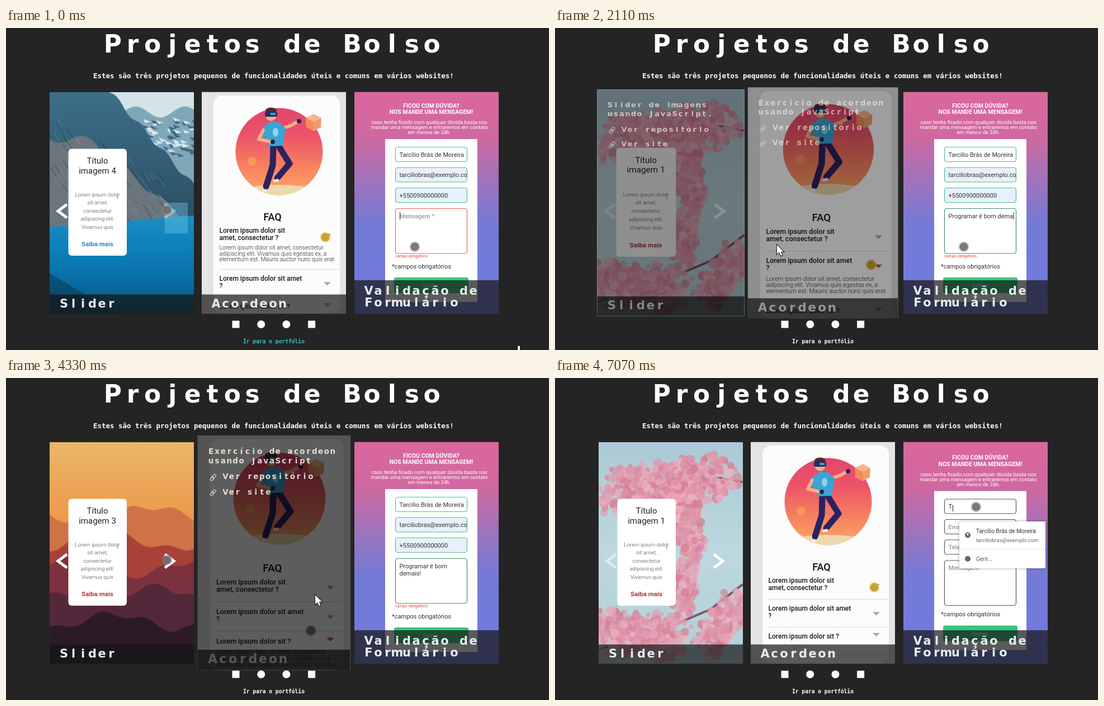
These frames come from a looping animation (971x577 px, 7100 ms). An HTML page with a canvas:

```html
<!DOCTYPE html>
<html lang="pt-BR">
<head>
<meta charset="utf-8">
<title>Projetos de Bolso</title>
<style>
html, body { margin: 0; width: 100%; height: 100%; overflow: hidden; background: #242424; }
canvas { display: block; width: 971px; height: 577px; }
</style>
</head>
<body>
<canvas id="stage" width="971" height="577"></canvas>
<script>
const LOOP = 7100;
const c = document.getElementById('stage').getContext('2d');
const CARD = { y: 114.5, w: 258, h: 397.5 };
const PERSON = 'Tarcílio Brás de Moreira', MAIL = 'tarciliobras@exemplo.com', PHONE = '+5500900000000';

// --- timing helpers ---
const clamp = v => Math.max(0, Math.min(1, v));
const mix = (a, b, u) => a + (b - a) * u;
const ramp = (t, from, to) => clamp((t - from) / (to - from));
const inside = (t, from, to) => t >= from && t < to;

// Stops are [arrival, x, y]; each move takes at most `travel` ms and ends on arrival.
function glide(stops, t, travel) {
  const i = stops.findIndex(s => s[0] > t);
  if (i < 1) return stops.at(i).slice(1);
  const [left, x0, y0] = stops[i - 1], [arrival, x1, y1] = stops[i];
  const u = ramp(t, Math.max(left, arrival - travel), arrival);
  return [mix(x0, x1, u), mix(y0, y1, u)];
}
function random(seed) {
  return () => (seed = (seed * 16807) % 2147483647) / 2147483647;
}

// --- drawing helpers ---
function text(s, x, y, font, color, align = 'left') {
  c.font = font;
  c.fillStyle = color;
  c.textAlign = align;
  c.fillText(s, x, y);
}
function lines(list, x, y, step, font, color, align) {
  list.forEach((s, i) => text(s, x, y + i * step, font, color, align));
}
const roboto = (size, weight = 400) => `${weight} ${size}px Roboto, sans-serif`;
const mono = size => `bold ${size}px "DejaVu Sans Mono", monospace`;
// Broad letters, each centred in a cell of the same width.
function wide(s, x, y, pitch, color = '#fff') {
  const font = `bold ${pitch * 1.23}px "DejaVu Sans", sans-serif`;
  [...s].forEach((ch, i) => text(ch, x + (i + .5) * pitch, y, font, color, 'center'));
}
function rect(x, y, w, h, color, g = c) {
  g.fillStyle = color;
  g.fillRect(x, y, w, h);
}
function round(x, y, w, h, r, fill, stroke) {
  c.beginPath();
  c.roundRect(x, y, w, h, r);
  if (fill) { c.fillStyle = fill; c.fill(); }
  if (stroke) { c.strokeStyle = stroke; c.lineWidth = 1.2; c.stroke(); }
}
function oval(x, y, rx, ry, color, g = c) {
  g.fillStyle = color;
  g.beginPath();
  g.ellipse(x, y, rx, ry, 0, 0, 7);
  g.fill();
}
const disc = (x, y, r, color, g) => oval(x, y, r, r, color, g);
function poly(pts, color, g = c) {
  g.fillStyle = color;
  g.beginPath();
  pts.forEach(p => g.lineTo(...p));
  g.fill();
}
function line(pts, color, width, g = c) {
  g.strokeStyle = color;
  g.lineWidth = width;
  g.beginPath();
  pts.forEach(p => g.lineTo(...p));
  g.stroke();
}
function shade(g, y0, y1, ...colors) {
  const s = g.createLinearGradient(0, y0, 0, y1);
  colors.forEach((k, i) => s.addColorStop(i / (colors.length - 1), k));
  return s;
}
// Fills everything below the curve y = height(x).
function ridge(g, height, color) {
  const pts = [[0, 398]];
  for (let x = 0; x <= 260; x += 5) pts.push([x, height(x)]);
  poly([...pts, [260, 398]], color, g);
}
function pointerDot([x, y], gold) {
  disc(x, y, 9.5, gold ? 'rgba(225,200,90,.55)' : 'rgba(150,145,145,.45)');
  disc(x, y, 7.5, gold ? '#c9a332' : 'rgba(112,106,108,.85)');
}

// --- slider pictures ---
function blossom(g, rnd) {
  rect(0, 0, 258, 398, shade(g, 0, 398, '#abcad5', '#bdd8de', '#b2d0d9'), g);
  line([[258, 72], [205, 62], [150, 35]], '#80525f', 3, g);
  line([[258, 255], [200, 300], [130, 330], [0, 372]], '#80525f', 4, g);
  const boughs = [[15, 90, 215, 62, 42], [150, 70, 165, 185, 26], [0, 340, 130, 350, 42], [165, 180, 150, 300, 20], [245, 290, 190, 365, 30]];
  for (const [x0, y0, x1, y1, spread] of boughs) {
    const count = Math.hypot(x1 - x0, y1 - y0) * spread / 14;
    for (let i = 0; i < count; i++) {
      const u = rnd(), a = rnd() * 7, d = spread * Math.sqrt(rnd());
      const color = `hsla(${338 + rnd() * 10}, ${45 + rnd() * 15}%, ${66 + rnd() * 16}%, .75)`;
      disc(mix(x0, x1, u) + d * Math.cos(a), mix(y0, y1, u) + d * Math.sin(a), 3 + rnd() * 6, color, g);
    }
  }
}
function meadow(g, rnd) {
  rect(0, 0, 258, 398, shade(g, 0, 398, '#42aeb4', '#66bfb8', '#8fcbb4', '#86a96a'), g);
  const heads = [[197, 127], [157, 178], [166, 211], [215, 235]];
  for (let i = 0; i < 16; i++) heads.push([i * 17, 310 + rnd() * 70]);
  for (const [x, y] of heads) {
    line([[x, y], [x + 6, y + 60], [x - 4, 398]], '#648c48', 2, g);
    for (let i = 0; i < 28; i++) {
      disc(x + (rnd() - .5) * 28, y + (rnd() - .5) * 13, 1.5 + rnd() * 3, `hsl(55, 78%, ${46 + rnd() * 16}%)`, g);
    }
  }
}
function sunset(g) {
  rect(0, 0, 258, 398, shade(g, 0, 398, '#e8b868', '#ee9a4c', '#d8703f', '#a04038'), g);
  for (let i = 0; i < 5; i++) {
    const wave = x => 130 + i * 48 + 14 * Math.sin(x / 38 + i * 2) + 6 * Math.sin(x / 13 + i);
    ridge(g, wave, `hsl(${20 - i * 15}, ${58 - i * 8}%, ${54 - i * 10}%)`);
  }
}
function lake(g, rnd) {
  rect(0, 0, 258, 398, '#d3e3e8', g);
  ridge(g, x => 36 + 10 * Math.sin(x / 14), '#7fa7ba');
  for (let i = 0; i < 70; i++) {
    const x = 165 + rnd() * 93, y = 45 + rnd() * 65;
    poly([[x, y], [x + 14, y + 5], [x + 4, y + 7]], i % 2 ? '#d9e8ee' : '#41677d', g);
  }
  ridge(g, x => (x - 108) * 1.12 + 5 * Math.sin(x / 7), shade(g, 0, 230, '#3d7089', '#2b4e62'));
  ridge(g, x => Math.max(85, x * .88 + 18) + 6 * Math.sin(x / 12), '#6b757d');
  for (let i = 0; i < 110; i++) {
    const x = rnd() * 200, y = x * .5 + 40 + rnd() * 120;
    line([[x, y], [x + 10, y + 14]], i % 2 ? 'rgba(35,55,68,.4)' : 'rgba(150,165,172,.3)', 1.5, g);
  }
  ridge(g, x => 242 - x * .08, shade(g, 225, 398, '#1b8dc0', '#0d7fba', '#0a6da3', '#0a4f73'));
  ridge(g, x => 325 + x * .6, 'rgba(5,45,65,.45)');
}
const scenes = [blossom, meadow, sunset, lake].map((paint, i) => {
  const pic = document.createElement('canvas');
  pic.width = 258;
  pic.height = 398;
  paint(pic.getContext('2d'), random(71 + i * 13));
  return pic;
});
const accents = ['#a33b34', '#d3c21c', '#c0392b', '#1f8fbd'];

// Three clicks one way, then three the other: [first click, gap, direction].
const clicks = [[850, 420, -1], [3200, 650, 1], [5500, 420, -1]].flatMap(([first, gap, dir]) =>
  [0, 1, 2].map(i => ({ time: first + i * gap, dir })));

function slider(t) {
  const done = clicks.filter(k => k.time <= t);
  const { time, dir } = done.at(-1) || { time: 0, dir: 1 };
  const now = done.reduce((n, k) => n + k.dir, 3);
  c.drawImage(scenes[done.length ? now - dir : now], 78, CARD.y);
  c.globalAlpha = done.length ? ramp(t, time, time + 120) : 1;
  c.drawImage(scenes[now], 78, CARD.y);
  c.globalAlpha = 1;

  round(111.5, 216.5, 104.5, 191.5, 6, '#fff');
  lines(['Título', 'imagem ' + (now + 1)], 163.5, 243, 17.5, roboto(15), '#222', 'center');
  lines(['Lorem ipsum dolor', 'sit amet,', 'consectetur', 'adipiscing elit.', 'Vivamus quis'],
    163.5, 302, 14.4, roboto(9.7, 300), '#444', 'center');
  rect(199, 296, 1, 11, '#888');
  text('Saiba mais', 163.5, 391, roboto(11.5, 700), accents[now], 'center');

  const chevron = (x, d, faint) => line([[x, 316], [x + 16 * d, 328], [x, 340]], faint ? 'rgba(255,255,255,.5)' : '#fff', 5);
  chevron(109, -1, now === 0);
  chevron(284, 1, now === 3);
  rect(dir > 0 ? 284 : 90, 313, 41, 55, `rgba(110,200,235,${.4 * (1 - ramp(t, time, time + 400))})`);
  const left = ramp(t, 290, 700) - ramp(t, 2400, 2770) + ramp(t, 4600, 5160);
  if (!inside(t, 1950, 2500) && t < 6300) pointerDot([mix(288, 100, left), mix(326, 338, left)]);
}

// --- accordion ---
function player() {
  c.save();
  c.beginPath();
  c.arc(488.5, 221.5, 78, 0, 7);
  c.clip();
  rect(410, 143, 158, 158, shade(c, 143, 300, '#e5446b', '#ec5568', '#f78060', '#fda866'));
  oval(488.5, 303, 90, 22, '#ecd8aa');
  c.restore();
  disc(440, 239, 8, '#f7985a');
  poly([[550, 154], [564, 161], [550, 168], [536, 161]], '#fbb488');
  poly([[536, 161], [550, 168], [550, 185], [537, 178]], '#f58a5c');
  poly([[564, 161], [550, 168], [550, 185], [563, 178]], '#ee9d6e');

  c.lineCap = c.lineJoin = 'round';
  const skin = '#f0b088', navy = '#2a2260', blue = '#3aa4d3';
  line([[494, 180], [509, 175], [523, 167]], skin, 6);
  line([[488, 212], [507, 243], [485, 269]], navy, 11);
  line([[478, 212], [477, 246], [465, 284]], navy, 11);
  line([[458, 293], [464, 291]], '#f3e5dc', 5);
  line([[480, 274], [486, 273]], '#f3e5dc', 5);
  poly([[461, 176], [474, 168], [488, 169], [500, 180], [495, 211], [470, 212], [464, 196], [455, 194]], blue);
  oval(482, 187, 5, 8, '#8fd2ea');
  line([[460, 183], [452, 199], [474, 204]], skin, 6);
  disc(477, 204, 4, '#20274f');
  disc(524, 167, 4, '#20274f');
  disc(474, 157, 9.5, skin);
  oval(474, 148, 10, 5.5, '#4a2b35');
  round(463, 150, 22, 9, 3, '#22305f');
  rect(473, 152, 9, 4, blue);
  c.lineCap = 'butt';
  c.lineJoin = 'miter';
}
const questions = [['Lorem ipsum dolor sit', 'amet, consectetur ?'], ['Lorem ipsum dolor sit amet', '?'], ['Lorem ipsum dolor sit ?']];
const answer = ['Lorem ipsum dolor sit amet, consectetur', 'adipiscing elit. Vivamus quis egestas ex, a', 'elementum est. Mauris auctor nunc quis erat.'];
const openings = [[0, -300, 900], [1, 1690, 2500], [2, 3650, 4400], [0, 4600, 6200]];
const faqDot = [[800, 571, 375], [1080, 562, 420], [2900, 534, 463], [4650, 571, 375], [5020, 517, 374], [6300, 571, 375]];

function accordion(t) {
  rect(350, CARD.y, 258.5, CARD.h, '#e4e4e5');
  round(371, 121, 226, 391, 15, '#fcfcfd');
  player();
  text('FAQ', 476.5, 345, roboto(18, 500), '#111', 'center');
  let top = 367;
  questions.forEach((question, row) => {
    const spans = openings.filter(o => o[0] === row);
    const open = Math.max(...spans.map(([, a, b]) => ramp(t, a, a + 200) - ramp(t, b, b + 200)));
    const red = spans.some(([, a, b]) => inside(t, a, b + 700));
    const last = top + (question.length - 1) * 12.5;
    lines(question, 381.5, top, 12.5, roboto(12, 500), '#181818');
    const y = (top + last) / 2 - (question.length > 1 ? 1 : 7);
    poly([[568, y - 3], [581, y - 3], [574.5, y + 3.5]], red ? '#cf4a3c' : '#a9a9ad');
    c.globalAlpha = open;
    lines(answer, 381.5, last + 17.5, 10.6, roboto(10.5, 300), '#222');
    c.globalAlpha = 1;
    top += 50 + 36 * open;
    rect(381, top - 21, 216, 1, '#dadadb');
  });
  const tapped = t < 850 || inside(t, 1690, 2400) || t > 6600;
  pointerDot(glide(faqDot, t, 400), tapped);
}

// --- form ---
function field(y, h, value, hint, fill, border) {
  round(696.5, y, 128, h, 4, fill, border);
  c.save();
  c.beginPath();
  c.rect(698, y, 126, h);
  c.clip();
  text(value || hint, 703.5, y + 17, roboto(11, value ? 400 : 700), value ? '#333' : '#a5a5ad');
  c.restore();
}
function typedMessage(t) {
  const pause = t >= 1690 ? 350 : 0;
  const count = Math.floor((t - pause - 360) / 70);
  return 'Programar é bom demais!'.slice(0, Math.max(0, Math.min(count, t < 2950 ? 22 : 23)));
}
function suggestions() {
  c.shadowColor = 'rgba(0,0,0,.35)';
  c.shadowBlur = 5;
  round(723, 257, 154, 84, 2, '#fff');
  c.shadowColor = 'transparent';
  rect(723, 306.5, 154, 1, '#e2e2e2');
  text(PERSON, 753, 277.5, roboto(10.2), '#333');
  text(MAIL, 753, 293.5, roboto(9.4), '#666');
  text('Gerir...', 753, 328, roboto(10), '#555');
  disc(738, 281.5, 5, '#666');
  disc(738, 280, 1.8, '#fff');
  disc(738, 324, 5, '#666');
}
function contact(t) {
  rect(623, CARD.y, 258, CARD.h, shade(c, 114, 512, '#da679d', '#d0689f', '#a073bb', '#747ad6', '#727bdb', '#7079d8'));
  const failed = t < 4850, blank = t >= 6200, typing = t < 3300;
  const dy = failed ? 0 : 3.5;
  lines(['FICOU COM DÚVIDA?', 'NOS MANDE UMA MENSAGEM!'], 760.5, 142.5 + dy, 11.5, roboto(10.5, 700), '#fff', 'center');
  lines(['caso tenha ficado com qualquer dúvida basta nos', 'mandar uma mensagem e entraremos em contato', 'em menos de 24h.'],
    757, 172 + dy, 9.2, roboto(9.4), '#fff', 'center');
  rect(678, 199 + dy, 165, 292 - 2 * dy, '#fff');

  const edge = blank ? '#555' : '#4fc083';
  const initial = t >= 6900 ? PERSON[0] : '';
  const values = blank ? [initial, '', ''] : [PERSON, MAIL.slice(0, -1), PHONE];
  ['Nome *', 'Email *', 'Telefone *'].forEach((hint, i) =>
    field(213.5 + 36.5 * i + dy, 26, values[i], hint, blank || !i ? '#fff' : '#e8f0fd', edge));

  const message = blank ? '' : typedMessage(t);
  const rows = message.length > 20 ? [message.slice(0, 15), message.slice(16)] : [message];
  const area = blank || !failed ? edge : message ? '#3f8c69' : '#f0605f';
  field(323.5 + dy, 80.5, rows[0], 'Mensagem *', '#fff', area);
  lines(rows.slice(1), 703.5, 354 + dy, 0, roboto(11), '#333');
  if (typing) {
    c.font = roboto(11);
    rect(704 + c.measureText(rows.at(-1)).width, 316 + 14 * rows.length, 1, 13, '#222');
  }
  if (failed) text('campo obrigatório', 696, 411, roboto(7.1), '#e53c35');
  text('*campos obrigatórios', 690, 430.5 - dy, roboto(11), '#333');
  round(694, 447 - dy, 133, 28, 3, '#35c77c');
  text('Enviar', 760, 465 - dy, roboto(10, 700), '#bfe8cf', 'center');

  if (initial) rect(711, 224 + dy, 1, 12, '#222');
  if (typing) pointerDot([731, 392]);
  if (t >= 6450) pointerDot([753, 231]);
  if (t >= 6600) suggestions();
}

// --- cards; hover lists the times at which the pointer enters and leaves ---
const cards = [
  { x: 78, paint: slider, label: ['Slider'], info: ['Slider de imagens', 'usando JavaScript.'], hover: [[20, 1985]] },
  { x: 350, paint: accordion, label: ['Acordeon'], info: ['Exercício de acordeon', 'usando JavaScript'], hover: [[1980, 2340], [4110, 4360]] },
  { x: 623, paint: contact, label: ['Validação de', 'Formulário'], info: ['Validação de', 'formulário usando', 'JavaScript'], hover: [[2370, 4050]] }
];
function hoverState(spans, t) {
  const easeOut = u => 1 - (1 - u) ** 1.8;
  let grow = 0, dim = 0;
  for (const [enter, leave] of spans) {
    const on = ramp(t, enter, enter + 280), off = ramp(t, leave, leave + 280);
    grow += easeOut(on) - easeOut(off);
    dim += on - off;
  }
  return [grow, dim];
}
function chain(x, y) {
  c.save();
  c.translate(x, y);
  c.rotate(-.8);
  round(-6, -2, 7, 4.4, 2.2, null, '#ddd');
  round(-1, -2.4, 7, 4.4, 2.2, null, '#ddd');
  c.restore();
}
function drawCard({ x, paint, label, info, hover }, t) {
  const [grow, dim] = hoverState(hover, t);
  const cx = x + CARD.w / 2, cy = CARD.y + CARD.h / 2, scale = 1 + .061 * grow;
  c.save();
  c.translate(cx, cy);
  c.scale(scale, scale);
  c.translate(-cx, -cy);
  c.beginPath();
  c.rect(x, CARD.y, CARD.w, CARD.h);
  c.clip();
  paint(t);
  const barY = label.length > 1 ? 452 : 477.5;
  rect(x, barY, CARD.w, 60, 'rgba(20,20,20,.7)');
  label.forEach((s, i) => wide(s, x + 17, (label.length > 1 ? 478 : 500.5) + i * 21, 17, '#e4eef0'));
  if (dim > 0) {
    rect(x, CARD.y, CARD.w, CARD.h, `rgba(0,0,0,${.8 * dim})`);
    c.globalAlpha = dim ** .7;
    info.forEach((s, i) => wide(s, x + 17.5, 145.5 + i * 15.8, 10.3, '#fff4ea'));
    ['Ver repositório', 'Ver site'].forEach((s, i) => {
      const y = 157 + info.length * 15.8 + i * 25.6;
      chain(x + 26, y - 3);
      wide(s, x + 42, y, 10.3, '#fff4ea');
    });
  }
  c.restore();
}

// --- page pointer ---
const icons = [0, 1, 2, 3].map(i => 411 + 45.2 * i);
const stops = [[20, 250, 470], [800, 314, 401], [2080, 377, 389], [2710, 781, 385], [3600, 713, 217], [4650, 419, 533],
  ...icons.slice(1).map((x, i) => [5450 + i * 330, x + 2, 533]), [6500, 480, 559], [7000, 440, 590]];
const arrowShape = new Path2D('M0 0V16.5L4 13L7 19.5L9.6 18.3L6.8 12H12Z');
const handShape = new Path2D('M-2 1.5Q0 -1.5 2 1.5V8L8 9.5Q10 10 10 13L8 21H-1L-7 13Q-6.5 10 -4 11.5L-2 13Z');
function pointer(x, y, shape) {
  c.save();
  c.translate(x, y);
  c.lineWidth = 2;
  c.strokeStyle = '#111';
  c.stroke(shape);
  c.fillStyle = '#fff';
  c.fill(shape);
  c.restore();
}
function status(s) {
  const font = '11px "Open Sans", sans-serif';
  c.font = font;
  round(-5, 561, c.measureText(s).width + 11, 20, 4, '#101010', '#333');
  text(s, 0, 575, font, '#9a9a9a');
}

// Stretches in which the picture rests: [from, to, moment shown].
const rests = [[20, 270, 150], [1340, 1690, 1340], [3810, 3900, 3810], [6760, 6820, 6760]];
function draw(time) {
  const rest = rests.find(([from, to]) => inside(time, from, to));
  const t = rest ? rest[2] : time;
  const [px, py] = t < 20 ? [917, 569] : glide(stops, t, 700);

  rect(0, 0, 971, 577, '#242424');
  wide('Projetos de Bolso', 173, 43.5, 35.67);
  text('Estes são três projetos pequenos de funcionalidades úteis e comuns em vários websites!', 156, 90, mono(12.46), '#fff');
  cards.forEach(card => drawCard(card, t));

  const active = icons.findIndex(x => inside(py, 520, 545) && Math.abs(px - x - 2) < 14);
  icons.forEach((x, i) => {
    const color = i === active ? '#3d9bd3' : '#fff';
    if (i % 3) disc(x, 531, 7, color);
    else rect(x - 6.5, 524.5, 13, 13, color);
  });
  const onLink = inside(py, 550, 577), onCardLink = py < 235;
  text('Ir para o portfólio', 424, 565, mono(9.62), onLink ? '#35c2cf' : '#fff');

  if (inside(t, 20, 290)) status('portfolio/');
  if (inside(t, 3700, 4150)) status('esafio-3-js-intermediario/');
  if (inside(t, 4950, 6850)) status('ciliobras/');
  pointer(px, py, active >= 0 || onLink || onCardLink ? handShape : arrowShape);
}

const start = performance.now();
function tick() {
  draw((performance.now() - start) % LOOP);
  requestAnimationFrame(tick);
}
tick();
</script>
</body>
</html>
```
